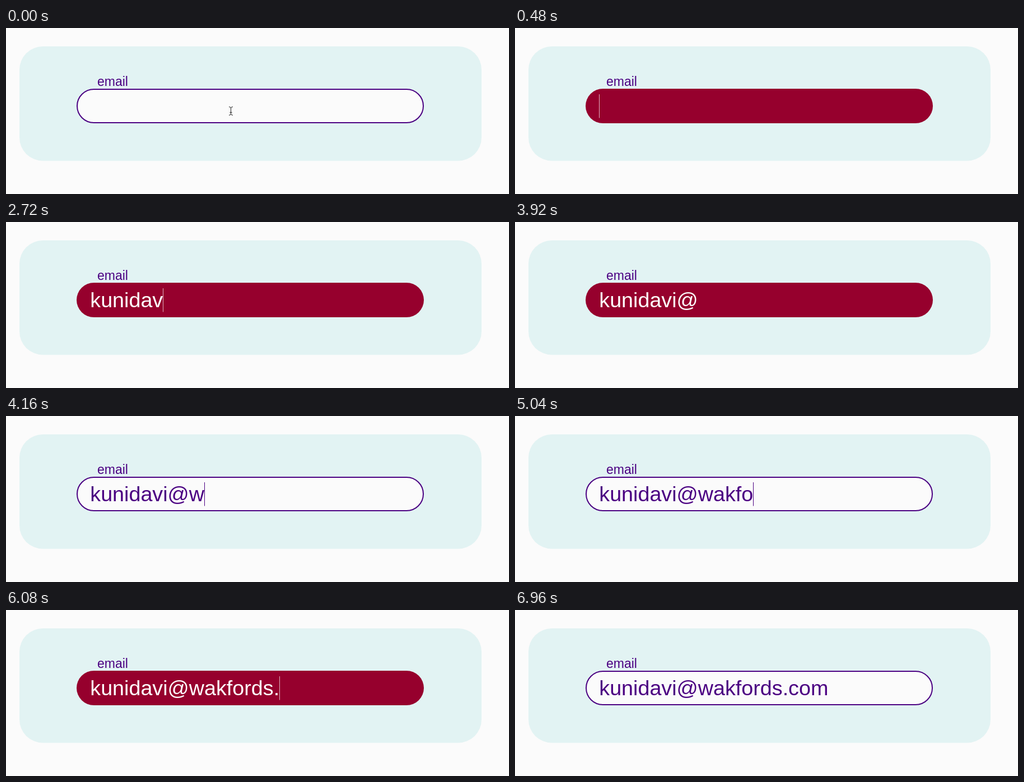
Write an HTML page with a canvas that moves like this. It is 898 by 298 pixels and loops after 8000 ms.

```html
<!DOCTYPE html>
<html lang="en">
<head>
<meta charset="utf-8">
<title>Email field</title>
<style>
  html, body { margin: 0; width: 100%; height: 100%; overflow: hidden; background: #fbfbfb; }
  canvas { display: block; width: 898px; height: 298px; }
</style>
</head>
<body>
<canvas id="stage" width="898" height="298"></canvas>
<script>
const ctx = document.getElementById('stage').getContext('2d');

const LOOP = 8000;
const PAPER = '#fbfbfb', CARD = '#e2f3f3', INK = '#4b0082', ALERT = '#96002d';
const FONT = '"Liberation Sans", Arial, sans-serif';
const ADDRESS = 'kunidavi@wakfords.com';
const TEXT_X = 150.3;
const FOCUS = 320;
const BLINK = 500; // the caret stays solid this long after a key

// One key time per character of the address
const KEYS = [
  1280, 1600, 1760, 1920, 2080, 2320, 2480, 2800, 3280,
  4000, 4480, 4640, 4800, 4960, 5200, 5360, 5600, 6000,
  6240, 6400, 6480
];

const isValid = text => /^\w+@\w+(\.\w+)*$/.test(text);

function pill(x, y, w, h, r) {
  ctx.beginPath();
  ctx.roundRect(x, y, w, h, r);
}

function label(text, x, y, size, color) {
  ctx.font = `${size}px ${FONT}`;
  ctx.fontKerning = 'none';
  ctx.fillStyle = color;
  ctx.fillText(text, x, y);
}

function drawPointer(x, y) {
  ctx.beginPath();
  ctx.moveTo(x - 3.5, y - 7.5);
  ctx.quadraticCurveTo(x, y - 7.5, x, y - 5);
  ctx.quadraticCurveTo(x, y - 7.5, x + 3.5, y - 7.5);
  ctx.moveTo(x, y - 5);
  ctx.lineTo(x, y + 5);
  ctx.moveTo(x - 3.5, y + 7.5);
  ctx.quadraticCurveTo(x, y + 7.5, x, y + 5);
  ctx.quadraticCurveTo(x, y + 7.5, x + 3.5, y + 7.5);
  ctx.moveTo(x - 2, y + 2.5);
  ctx.lineTo(x + 2, y + 2.5);
  ctx.strokeStyle = '#222';
  ctx.lineWidth = 1;
  ctx.stroke();
}

function drawField(alert) {
  if (alert) {
    pill(126, 109, 620, 62, 31);
    ctx.fillStyle = ALERT;
    ctx.fill();
    return;
  }
  pill(127, 110, 618, 60, 30);
  ctx.fillStyle = PAPER;
  ctx.fill();
  ctx.strokeStyle = INK;
  ctx.lineWidth = 2;
  ctx.stroke();
}

function draw(t) {
  const focused = t >= FOCUS;
  const count = KEYS.filter(k => k <= t).length;
  const text = ADDRESS.slice(0, count);
  const alert = focused && !isValid(text);
  const lastKey = count ? KEYS[count - 1] : FOCUS + 60;

  ctx.fillStyle = PAPER;
  ctx.fillRect(0, 0, 898, 298);
  pill(24, 33, 825, 205.5, 42);
  ctx.fillStyle = CARD;
  ctx.fill();

  label('email', 163, 104, 23, INK);
  drawField(alert);
  label(text, TEXT_X, 153.3, 37.7, alert ? '#fff' : INK);

  if (!focused) drawPointer(401.5, 149);
  const caretOn = focused && t - lastKey < (count === KEYS.length ? 480 : BLINK);
  if (caretOn) {
    const x = Math.round(TEXT_X + ctx.measureText(text).width);
    ctx.fillStyle = alert ? 'rgba(255,255,255,.7)' : INK;
    ctx.fillRect(x, 119, 1, 42.5);
  }
}

const start = performance.now();
function tick() {
  draw((performance.now() - start) % LOOP);
  requestAnimationFrame(tick);
}
tick();
</script>
</body>
</html>
```
